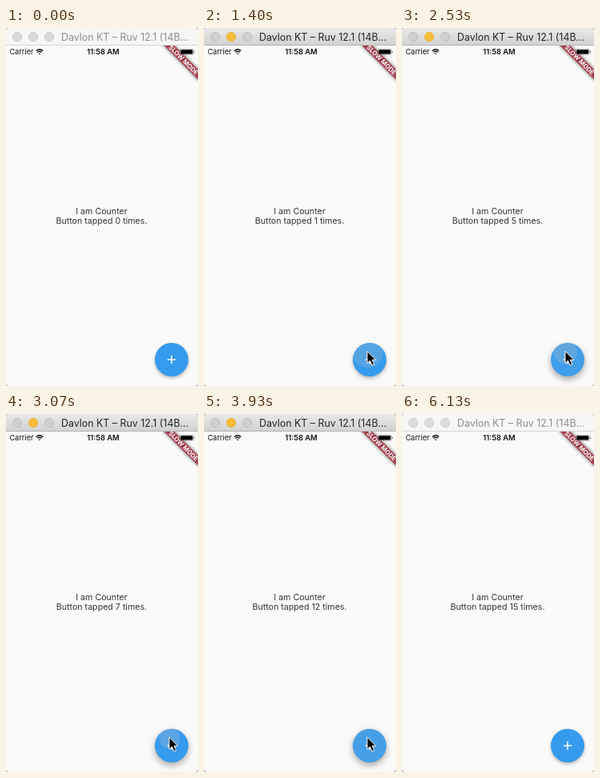
Recreate the animation shown at these times as an HTML page. Size 240 px wide and 448 px high, loop 6270 ms.

```html
<!DOCTYPE html>
<html lang="en">
<head>
<meta charset="utf-8">
<title>Counter demo</title>
<style>
  html, body { margin: 0; width: 100%; height: 100%; overflow: hidden; background: #a4a4a4; }
  svg { display: block; width: 100%; height: 100%; }
  text { font-family: Inter, "Liberation Sans", sans-serif; }
</style>
</head>
<body>
<svg viewBox="0 0 240 448">
  <defs>
    <linearGradient id="activeBar" x2="0" y2="1">
      <stop stop-color="#e9e9e9"/><stop offset="1" stop-color="#d1d1d1"/>
    </linearGradient>
    <clipPath id="window"><rect width="240" height="448" rx="4"/></clipPath>
    <clipPath id="screen"><rect y="22" width="240" height="426"/></clipPath>
    <clipPath id="buttonShape"><circle cx="207" cy="415" r="21"/></clipPath>
    <filter id="lowBlur" x="-50%" y="-50%" width="200%" height="200%"><feGaussianBlur stdDeviation="2.8"/></filter>
    <filter id="highBlur" x="-50%" y="-50%" width="200%" height="200%"><feGaussianBlur stdDeviation="4.2"/></filter>
    <filter id="bannerBlur" x="-50%" y="-100%" width="200%" height="300%"><feGaussianBlur stdDeviation="2"/></filter>
  </defs>

  <g clip-path="url(#window)">
    <rect width="240" height="448" fill="#fafafa"/>

    <rect id="bar" width="240" height="22"/>
    <path id="barLine" d="M0 21.5H240"/>
    <g id="lights" stroke-width=".8">
      <circle cx="14" cy="11" r="5.7"/><circle cx="34" cy="11" r="5.7"/><circle cx="54" cy="11" r="5.7"/>
    </g>
    <text id="title" x="69" y="16" font-size="12.4">Davlon KT – Ruv 12.1 (14B...</text>

    <g clip-path="url(#screen)">
      <g transform="translate(240 22) rotate(45)">
        <rect x="-32" y="21" width="64" height="9" opacity=".6" filter="url(#bannerBlur)"/>
        <rect x="-32" y="21" width="64" height="9" fill="#b42234" opacity=".66"/>
        <text y="28.3" font-size="7.8" font-weight="700" fill="#fff" text-anchor="middle">SLOW MODE</text>
      </g>
    </g>

    <text x="4.4" y="33" font-size="9.2" fill="#111">Carrier</text>
    <g fill="none" stroke="#111" stroke-width="1.4">
      <path d="M37.8 28.6Q42 24.9 46.2 28.6M39.4 30.4Q42 28.2 44.6 30.4"/>
      <path d="M42 33.2L40.8 31.9Q42 30.9 43.2 31.9Z" fill="#111" stroke="none"/>
    </g>
    <text x="121.5" y="33" font-size="9.4" font-weight="600" fill="#111" text-anchor="middle">11:58 AM</text>
    <rect x="217.4" y="26.4" width="17" height="7" rx="1.6" fill="none" stroke="#777" stroke-width=".5"/>
    <rect x="218.4" y="27.3" width="15" height="5.2" rx=".8"/>
    <path d="M235.1 28.6q1.5 1.3 0 2.6z"/>

    <g font-size="10.65" fill="#333" text-anchor="middle">
      <text x="119.5" y="232.8">I am Counter</text>
      <text id="count" x="119.5" y="244.6"></text>
    </g>

    <circle id="lowShadow" cx="207" cy="417" r="20.5" filter="url(#lowBlur)"/>
    <circle id="highShadow" cx="207" cy="418.5" r="21" filter="url(#highBlur)"/>
    <circle cx="207" cy="415" r="21" fill="#369bed"/>
    <g id="splashes" clip-path="url(#buttonShape)" fill="#c0c0c0"></g>
    <path d="M201.8 415h10.4M207 409.8v10.4" stroke="#fff" stroke-width="1.6"/>

    <circle id="ring" cx="205" cy="407" r="22.8" fill="none" stroke="#111" stroke-width="1.6"/>
    <path id="cursor" d="M0 0V15L3.5 11.8L6 17.6L8.7 16.4L6.2 10.8H10.8Z" stroke="#fff" stroke-width="1"/>
  </g>
</svg>

<script>
const LOOP = 6270;
const FOCUS = 930, BLUR = 5800;
const PRESS = 90, SPLASH = 380;
const TAPS = [1300, 1590, 1850, 2240, 2460, 2690, 3010, 3200, 3330, 3450, 3570, 3690, 4300, 4740, 5240];
const REST = [204, 404.5], OFFSTAGE = [102, 452];

const $ = id => document.getElementById(id);
const set = (node, attributes) => {
  for (const name in attributes) node.setAttribute(name, attributes[name]);
};
const progress = (t, start, end) => Math.min(1, Math.max(0, (t - start) / (end - start)));
const ease = p => p * p * (3 - 2 * p);
// Rises from 0 to 1 over the first span and falls back over the second.
const pulse = (t, riseStart, riseEnd, fallStart, fallEnd) =>
  ease(progress(t, riseStart, riseEnd)) - ease(progress(t, fallStart, fallEnd));

const splashes = TAPS.map(() => {
  const circle = document.createElementNS("http://www.w3.org/2000/svg", "circle");
  set(circle, { cx: 204.5, cy: 406 });
  return $("splashes").appendChild(circle);
});

function drawTitleBar(active) {
  set($("bar"), { fill: active ? "url(#activeBar)" : "#f6f6f6" });
  set($("barLine"), { stroke: active ? "#b4b4b4" : "#d6d6d6" });
  set($("title"), { fill: active ? "#262626" : "#8e8e8e" });
  [...$("lights").children].forEach((light, i) => {
    const yellow = active && i === 1;
    set(light, {
      fill: yellow ? "#f6bd3b" : active ? "#cfcfcf" : "#dadada",
      stroke: yellow ? "#e9b13c" : active ? "#bababa" : "#cacaca"
    });
  });
}

function drawSplash(circle, age) {
  const visible = age >= 0 && age < SPLASH;
  set(circle, {
    r: visible ? 4 + age * 0.15 : 0,
    opacity: visible ? 0.3 * (1 - age / SPLASH) : 0
  });
}

function drawShadow(lift) {
  set($("lowShadow"), { opacity: 0.32 * (1 - lift) });
  set($("highShadow"), { opacity: 0.34 * lift });
}

function draw(t) {
  const firstTap = TAPS[0], lastTap = TAPS[TAPS.length - 1];
  drawTitleBar(t >= FOCUS && t < BLUR);
  $("count").textContent = `Button tapped ${TAPS.filter(tap => t >= tap).length} times.`;
  splashes.forEach((circle, i) => drawSplash(circle, t - TAPS[i]));
  drawShadow(pulse(t, firstTap, firstTap + 400, lastTap, lastTap + 600));

  const pressed = [FOCUS, ...TAPS].some(tap => t >= tap - PRESS && t < tap);
  set($("ring"), { visibility: pressed ? "visible" : "hidden" });

  const arrival = pulse(t, 70, 670, 5500, 6060);
  const [x, y] = REST.map((end, i) => OFFSTAGE[i] + (end - OFFSTAGE[i]) * arrival);
  set($("cursor"), { transform: `translate(${x} ${y})` });
}

function tick() {
  draw(performance.now() % LOOP);
  requestAnimationFrame(tick);
}
tick();
</script>
</body>
</html>
```
